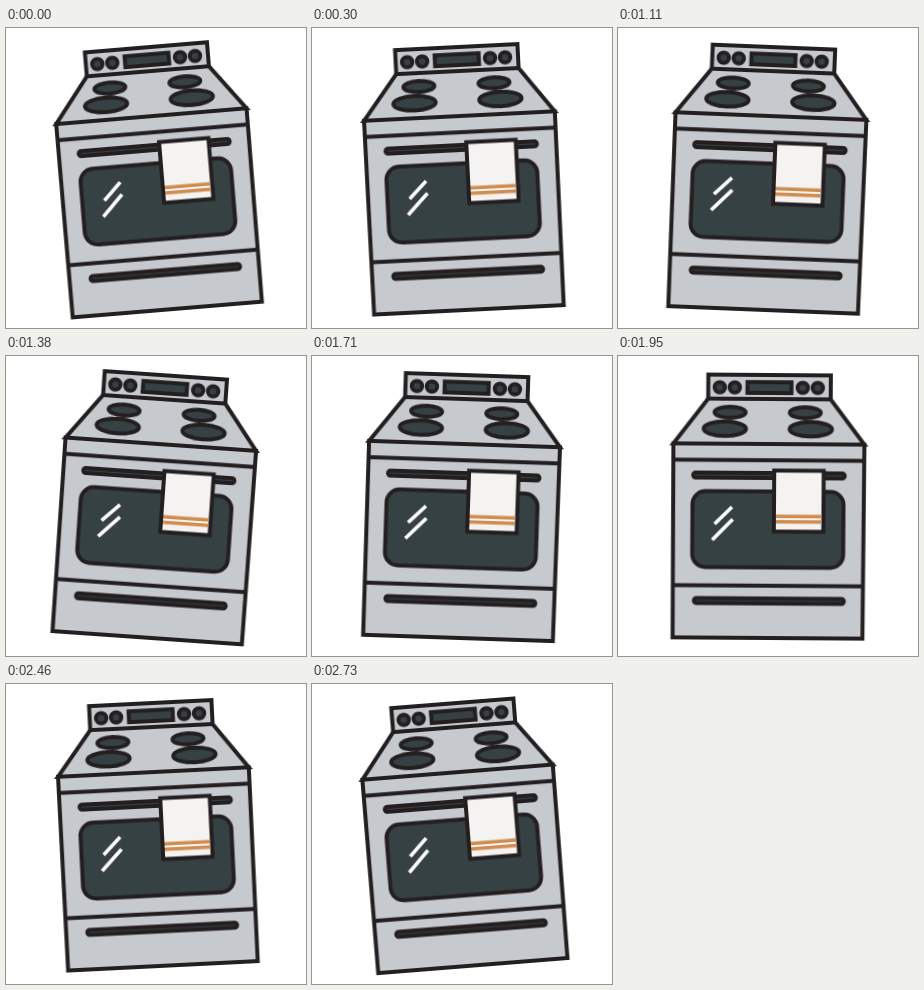
Write an HTML page that moves like this. It is 300 px wide and 300 px high and loops after 2760 ms.

```html
<!DOCTYPE html>
<html lang="en">
<head>
<meta charset="utf-8">
<title>Rocking stove</title>
<style>
  html, body { margin: 0; width: 100%; height: 100%; overflow: hidden; background: #fff; }
  svg { display: block; width: 100%; height: 100%; }
  .stove {
    fill: #c6c9ce;
    stroke: #231f20;
    stroke-width: 4;
    transform-origin: 150px 150px;
    animation: rock 2760ms steps(46) infinite;
  }
  .dark { fill: #364144; }
  .towel { fill: #f4f3f1; }
  .stripes { stroke: #d18d50; stroke-width: 3.6; }
  .shine { stroke: #fff; stroke-width: 3.6; }
  @keyframes rock {
    0%, 100% { transform: rotate(-4.75deg); }
    50% { transform: rotate(4deg); }
  }
</style>
</head>
<body>
<svg viewBox="0 0 300 300">
  <g class="stove">
    <!-- control panel -->
    <rect x="89.5" y="19" width="122.5" height="24"/>
    <g class="dark">
      <circle cx="101" cy="31.6" r="5.2"/>
      <circle cx="116" cy="31.6" r="5.2"/>
      <circle cx="184" cy="31.6" r="5.2"/>
      <circle cx="199" cy="31.6" r="5.2"/>
      <rect x="128.7" y="26.2" width="44" height="10.8"/>
    </g>

    <!-- cooktop -->
    <path d="M89.5 43H212L246 88H55Z"/>
    <g class="dark">
      <ellipse cx="111.5" cy="56.5" rx="15.5" ry="5.6"/>
      <ellipse cx="186.7" cy="56.5" rx="15.5" ry="5.6"/>
      <ellipse cx="106.3" cy="73" rx="21.2" ry="7.2"/>
      <ellipse cx="192.3" cy="73" rx="21.2" ry="7.2"/>
    </g>

    <!-- body, door and drawer -->
    <path d="M55 88H246L245.3 282H55.5ZM55 104.3H246M55.3 229.7H245.5"/>
    <g class="dark">
      <rect x="74.5" y="135.5" width="151" height="76" rx="13"/>
      <rect x="75" y="117" width="151.5" height="5" rx="2.5"/>
      <rect x="76.5" y="242.5" width="150" height="5" rx="2.5"/>
    </g>
    <path class="shine" d="M96.7 168.2L114 151.2M94.4 184.2L114.8 163.4"/>

    <!-- towel -->
    <rect class="towel" x="156" y="114.5" width="49.5" height="61"/>
    <path class="stripes" d="M158 160.2H203.5M158 165.7H203.5"/>
  </g>
</svg>
</body>
</html>
```
